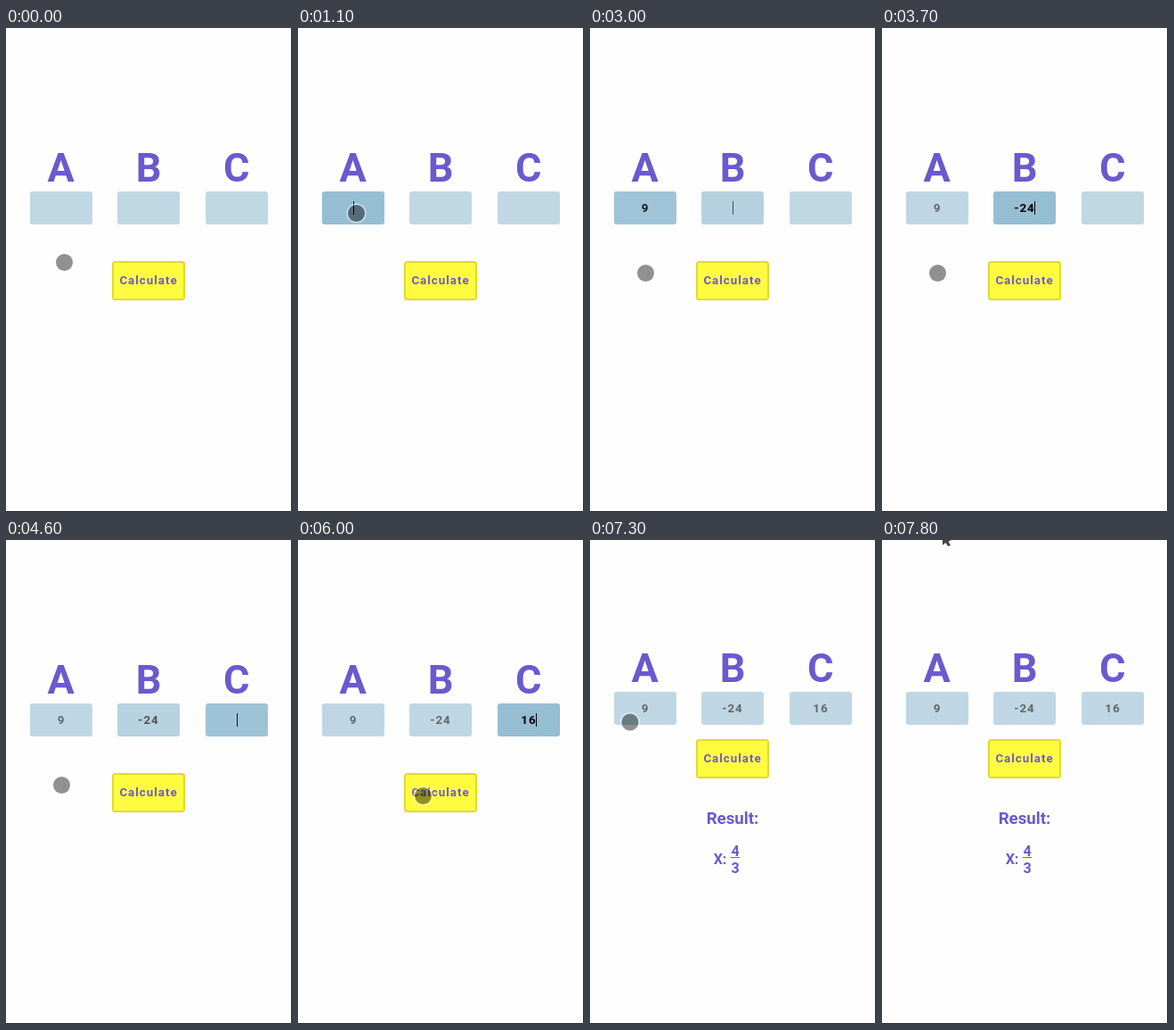
Recreate the animation shown at these times as an HTML page. Size 321x542 px, loop 8100 ms.

```html
<!DOCTYPE html>
<html lang="en">
<head>
<meta charset="utf-8">
<title>Quadratic calculator</title>
<style>
  html, body { margin: 0; width: 100%; height: 100%; overflow: hidden; background: #fffeff; }
  svg { display: block; font-family: Roboto, sans-serif; font-weight: 700; fill: #6a5acd; text-anchor: middle; }
  .label { font-size: 45px; }
  .small { font-size: 13.333px; letter-spacing: 1px; }
  .value { fill: #000; }
</style>
</head>
<body>
<svg width="321" height="542" viewBox="0 0 321 542">
  <g id="form"></g>
  <g id="button">
    <rect x="120" y="262" width="80" height="42" rx="2.5" fill="#fffc40" stroke="#e2da32" stroke-width="2"/>
    <text class="small" x="160" y="287">Calculate</text>
  </g>
  <g id="result">
    <text x="160" y="318" font-size="18.72">Result:</text>
    <g font-size="16">
      <text x="146" y="363">X:</text>
      <text x="163" y="354">4</text>
      <rect x="158" y="355" width="10" height="1"/>
      <text x="163" y="373">3</text>
    </g>
  </g>
  <g id="touch">
    <circle r="10.3" fill="none" stroke="#fff" stroke-opacity=".5" stroke-width="1.6"/>
    <circle r="9.5" fill="#000" fill-opacity=".43"/>
  </g>
  <path id="arrow" d="M68 0H78L74.5 1.8 77 6 74 7 71.5 3 68 5.8Z" fill="#444"/>
  <path d="M320.5 0V541.5H0" fill="none" stroke="#222"/>
</svg>
<script>
const LOOP = 8100, STEP = 100, BLINK = 500;
const $ = id => document.getElementById(id);

// Each key is [time, text, caret x]; the first one is the moment of focus.
const fields = [
  { name: 'A', x: 27, labelX: 61.7, blur: 3000, keys: [[900, '', 62], [2200, '9', 66]] },
  { name: 'B', x: 125, labelX: 160.2, blur: 4500, keys: [[3000, '', 160], [3500, '-2', 167], [3700, '-24', 171]] },
  { name: 'C', x: 224, labelX: 258.7, blur: 6300, keys: [[4500, '', 259], [4900, '1', 263], [5000, '16', 267]] }
];

const moves = [
  { start: 100, end: 600, from: [65.5, 262.5], to: [65.5, 207.5] },
  { start: 1300, end: 1700, from: [65.5, 207.5], to: [62.5, 274.5] },
  { start: 5400, end: 6000, from: [62.5, 274.5], to: [140.5, 286.5] }
];
const exit = { start: 7000, end: 7800, points: [[140.5, 286.5], [30, 270], [-24, 60], [72, -8]] };

function add(parent, tag, attrs) {
  const el = document.createElementNS('http://www.w3.org/2000/svg', tag);
  for (const key in attrs) el.setAttribute(key, attrs[key]);
  return parent.appendChild(el);
}

for (const f of fields) {
  add($('form'), 'text', { class: 'label', x: f.labelX, y: 172 }).textContent = f.name;
  f.group = add($('form'), 'g', {});
  add(f.group, 'rect', { x: f.x, y: 183, width: 70, height: 37, rx: 3, fill: '#96bed3' });
  f.text = add(f.group, 'text', { class: 'small value', x: f.x + 35, y: 206 });
  f.caret = add(f.group, 'rect', { y: 194, width: 1, height: 15, fill: '#000' });
}

const clamp = v => Math.max(0, Math.min(1, v));
const progress = (t, m) => clamp((t - m.start) / (m.end - m.start));
const smooth = u => u * u * (3 - 2 * u);
const show = (el, on) => el.setAttribute('visibility', on ? 'visible' : 'hidden');

// Short fade sampled at the picture rate.
function fade(t, start) {
  if (t < start) return 0;
  return [0.25, 0.8][Math.floor((t - start) / STEP)] ?? 1;
}

function touchPosition(t) {
  if (t > exit.start) {
    const u = progress(t, exit), v = 1 - u;
    const weights = [v * v * v, 3 * v * v * u, 3 * v * u * u, u * u * u];
    return [0, 1].map(axis => weights.reduce((sum, w, i) => sum + w * exit.points[i][axis], 0));
  }
  const move = moves.filter(m => t >= m.start).pop() || moves[0];
  const u = smooth(progress(t, move));
  return move.from.map((a, i) => a + (move.to[i] - a) * u);
}

function drawField(f, t) {
  const focus = f.keys[0][0];
  const [time, text, caretX] = f.keys.filter(k => t >= k[0]).pop() || f.keys[0];
  const blinkOn = Math.floor((t - time) / BLINK) % 2 === 0;
  f.group.setAttribute('opacity', 0.6 + 0.4 * (fade(t, focus) - fade(t, f.blur)));
  f.text.textContent = text;
  f.caret.setAttribute('x', caretX);
  show(f.caret, t >= focus && t < f.blur && blinkOn);
}

function draw(time) {
  const t = Math.floor((time % LOOP) / STEP) * STEP;
  const solved = t >= 6300, left = t >= exit.end;
  for (const f of fields) drawField(f, t);
  $('form').setAttribute('transform', `translate(0 ${solved ? -13 : 0})`);
  $('button').setAttribute('transform', `translate(0 ${solved ? -38 : 0})`);
  $('touch').setAttribute('transform', `translate(${touchPosition(t).join(' ')})`);
  show($('result'), solved);
  show($('touch'), !left);
  show($('arrow'), left);
}

const origin = performance.now();
function tick() {
  draw(performance.now() - origin);
  requestAnimationFrame(tick);
}
tick();
</script>
</body>
</html>
```
